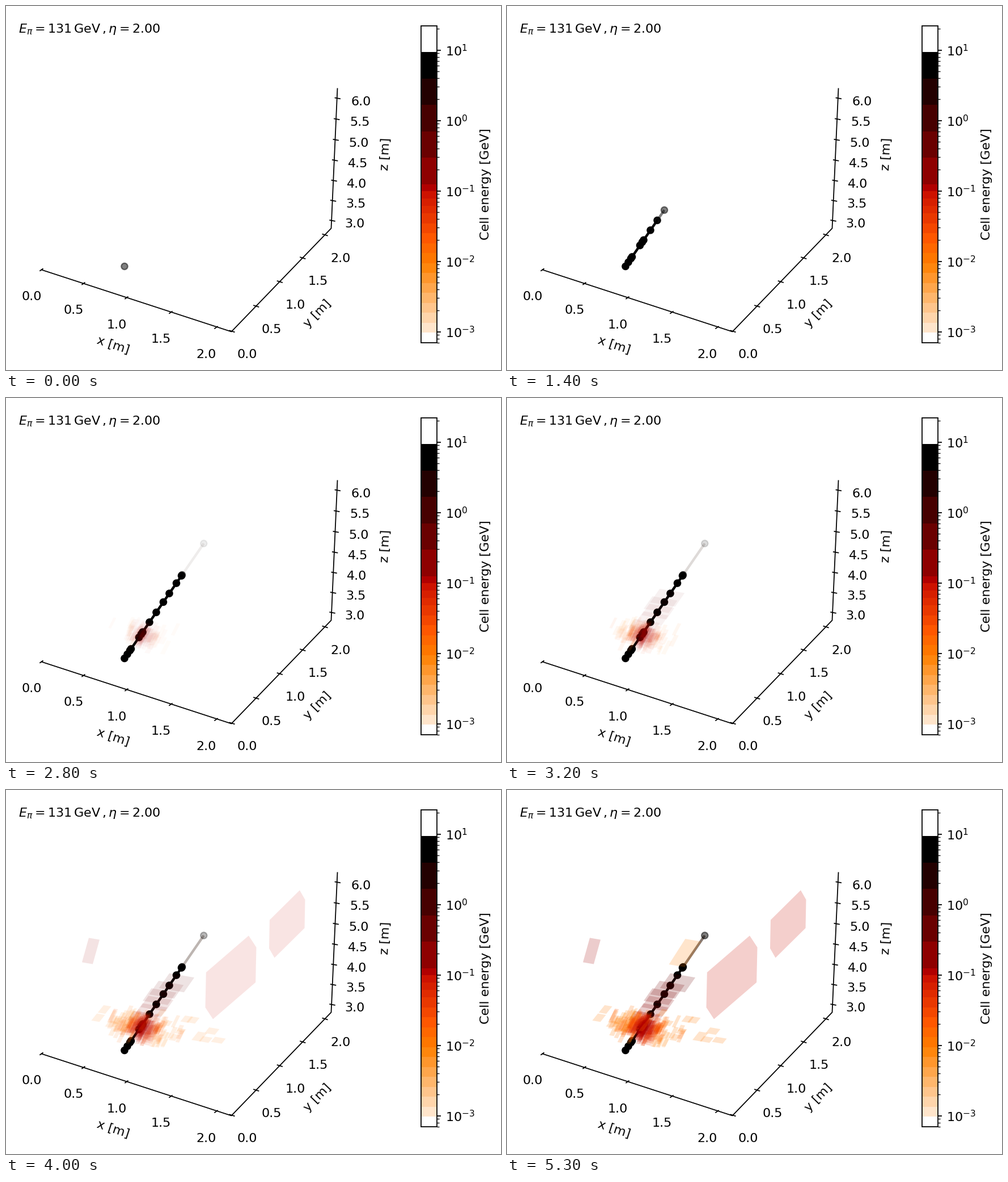
Animation of 873 by 641 pixels, one loop 6300 ms. Source, as a matplotlib script:

```python
import numpy as np
import matplotlib.pyplot as plt
from matplotlib.animation import FuncAnimation
from matplotlib.collections import LineCollection, PolyCollection
from matplotlib.patches import Rectangle

W, H, DPI = 873, 641, 160
FRAMES, STEP = 63, 100
TRACK_END, SHOWER_START, SHOWER_END = 22, 24, 53

plt.rcParams.update({"font.family": "DejaVu Sans", "font.size": 10})
fig = plt.figure(figsize=(W / DPI, H / DPI), dpi=DPI, facecolor="white")
ax = fig.add_axes([0, 0, 1, 1])
ax.set(xlim=(-0.5, W - 0.5), ylim=(H - 0.5, -0.5))  # whole numbers are pixel centres
ax.axis("off")


def heat(v):
    """Heat colours: 0 is black, 1 is white."""
    v = np.asarray(v, float)
    return np.clip(np.stack([1.5 * v, 2 * v - 1, 4 * v - 3], -1), 0, 1)


def line(x, y):
    ax.plot(x, y, color="black", lw=0.8, solid_capstyle="projecting")


def label(x, y, text, angle):
    ax.text(x, y, text, ha="center", va="center", rotation=angle)


def axis(values, start, step, bend, tick, offset, spread=0):
    """Ticks and numbers along one axis; bend is the perspective."""
    start, step, bend, tick, offset = map(np.array, (start, step, bend, tick, offset))
    for i, value in enumerate(values):
        pos = start + step * i + bend * i ** 2
        line(*np.stack([pos - tick, pos + tick], 1))
        x, y = pos + offset
        ax.text(x + spread * i, y + 8.1, f"{value:.1f}", ha="center", va="baseline")


# 3D axes
line([62, 397, 573, 584], [464, 573, 391, 145])
halves = np.arange(0, 2.1, 0.5)
axis(halves, (62, 464), (73, 23.9), (1, 0.38), (2.4, -1.7), (-17, 45.6))
axis(halves, (398, 572.3), (43.3, -44.8), (-0.57, 0.59), (4.2, 1.3), (27, 39.6))
axis(np.arange(3, 6.1, 0.5), (575, 377.5), (1.55, -34.9), (0, -0.17), (4.3, 0.8),
     (39, 4), spread=0.45)
label(188, 597, "x [m]", -18)
label(549, 541, "y [m]", 46)
label(669, 260, "z [m]", 87.4)
ax.text(22, 46.3, r"$E_{\pi} = 131\,\mathrm{GeV}\,, \eta = 2.00$")

# Colour bar
BAR_L, BAR_R, BAR_T, BAR_B = 731, 759, 34, 592
edges = np.r_[BAR_B - 17.5 * np.arange(13), np.linspace(364.5, 313, 5),
              np.linspace(313, BAR_T, 7)[1:]]
shades = np.r_[1, 0.98 - 0.031 * np.arange(1, 12), np.linspace(0.61, 0.535, 4),
               np.linspace(0.463, 0, 6)]
for low, high, rgb in zip(edges[:-1], edges[1:], heat(shades)):
    ax.add_patch(Rectangle((BAR_L, high), BAR_R - BAR_L, low - high,
                           facecolor=rgb, lw=0, antialiased=False))
ax.add_patch(Rectangle((BAR_L, BAR_T), BAR_R - BAR_L, BAR_B - BAR_T,
                       fill=False, ec="black", lw=0.8))

for power in range(-4, 2):
    for digit in range(1, 10):
        y = 201 - 124 * (power + np.log10(digit))
        if not BAR_T <= y <= BAR_B + 0.5:
            continue
        size, width = (7.8, 0.8) if digit == 1 else (4.5, 0.6)
        ax.plot([BAR_R, BAR_R + size], [y, y], color="black", lw=width,
                solid_capstyle="butt")
        if digit == 1:
            ax.text(774.6, y, rf"$10^{{{power}}}$", va="center_baseline")
label(846, 313.5, "Cell energy [GeV]", 90)

# Track: a straight line of hits, and the step at which each is reached
hit_x = np.array([208.5, 213.5, 218, 220, 234, 238, 240.5, 252.5, 264.5, 277,
                  287.5, 300, 309, 310, 348.3])
hits = np.stack([hit_x, 458 - 1.447 * (hit_x - hit_x[0])], 1)
reached = np.array([0, 1, 2, 3, 6, 8, 9, 10, 11, 14, 15, 17, 19, TRACK_END])

segments = LineCollection(np.stack([hits[:-1], hits[1:]], 1), linewidths=2,
                          capstyle="butt", zorder=3)
ax.add_collection(segments)
dots = ax.scatter(*hits.T, s=5.1 ** 2, linewidths=1, zorder=3.1)

# Shower cells
rng = np.random.default_rng(7)
polys, levels, starts = [], [], []


def add(poly, level, start):
    polys.append(poly)
    levels.append(level)
    starts.append(start)


def slab(x, y, w, h, shear):
    """Sheared four-sided cell around a centre."""
    u = np.array([w, 0.17 * w]) / 2
    v = np.array([-shear * h, h]) / 2
    return np.array([x, y]) + np.array([-u - v, u - v, u + v, v - u])


def hexagon(x, y, w, h):
    """Tilted six-sided cell in a box."""
    half = np.array([(0.35, -0.5), (0.5, -0.36), (0.485, 0.06)])
    return np.array([x, y]) + (np.r_[half, -half] + 0.5) * (w, h)


# Wide cells in the upper layers, following the track
for t in np.linspace(0, 1, 6):
    add(slab(240 + 56 * t + rng.uniform(-6, 6), 400 - 61 * t, 44, 16 + 10 * t, 0.7),
        0.4 - 0.12 * t, 27 + 6 * t)

# Dense core with a cooler rim
for i in range(215):
    sx, sy = (15, 9) if i % 4 == 0 else (33, 11)
    dx = np.clip(sx * rng.standard_normal(), -54, 66)
    dy = np.clip(sy * rng.standard_normal(), -24, 20)
    near = np.exp(-((dx + 0.4 * dy) / 22) ** 2 - (dy / 20) ** 2)
    level = 0.75 - 0.31 * near + 0.04 * rng.standard_normal()
    add(slab(241 + dx, 419 + 0.17 * dx + dy, rng.uniform(4, 9),
             rng.uniform(10, 24) + 5 * near, 0.5),
        level, 25 + (1 - near) * rng.uniform(0, 14))

# Stray cells, wider further out
for x in np.linspace(162, 374, 20):
    y = 416 + 0.15 * (x - 242) + rng.uniform(-30, 16)
    add(slab(x, y, 7 + abs(x - 242) / 11, rng.uniform(8, 15), 0.8),
        0.74, rng.uniform(33, 39))

# Large far cells
add(slab(149, 283, 19, 43, 0.28), 0.42, 34)
add(hexagon(351, 256, 90, 147), 0.53, 35)
add(hexagon(463.5, 176, 63.5, 119), 0.53, 36)
add(slab(313.5, 286.5, 28, 45, 0.64), 0.75, 42)

starts = np.array(starts)
cell_colors = np.c_[heat(levels), np.zeros(len(levels))]
cells = PolyCollection(polys, linewidths=0, edgecolors="none", zorder=4)
ax.add_collection(cells)


def update(frame):
    p = np.clip((frame - SHOWER_START) / (SHOWER_END - SHOWER_START), 0, 1)

    # Each hit is painted again at every step, so it darkens
    paints = np.maximum(min(frame, TRACK_END) - reached + 1, 0)
    opacity = 1 - 0.5 ** (paints + 3 * p * (paints > 0))

    dot_colors = np.zeros((len(hits), 4))
    dot_colors[:, 3] = np.r_[opacity, 0.5 * p]
    dots.set_facecolors(dot_colors)
    dots.set_edgecolors(dot_colors)

    seg_colors = np.zeros((len(hits) - 1, 4))
    seg_colors[:-1, 3] = opacity[1:]
    seg_colors[-1] = (0.2, 0.1, 0.05, 0.58 * p)
    segments.set_color(seg_colors)

    cell_colors[:, 3] = 0.2 * p * (frame >= starts)
    cells.set_facecolors(cell_colors)
    return segments, dots, cells


anim = FuncAnimation(fig, update, frames=FRAMES, interval=STEP,
                     init_func=lambda: update(0), repeat=True, repeat_delay=0, blit=False)
plt.show()
```
